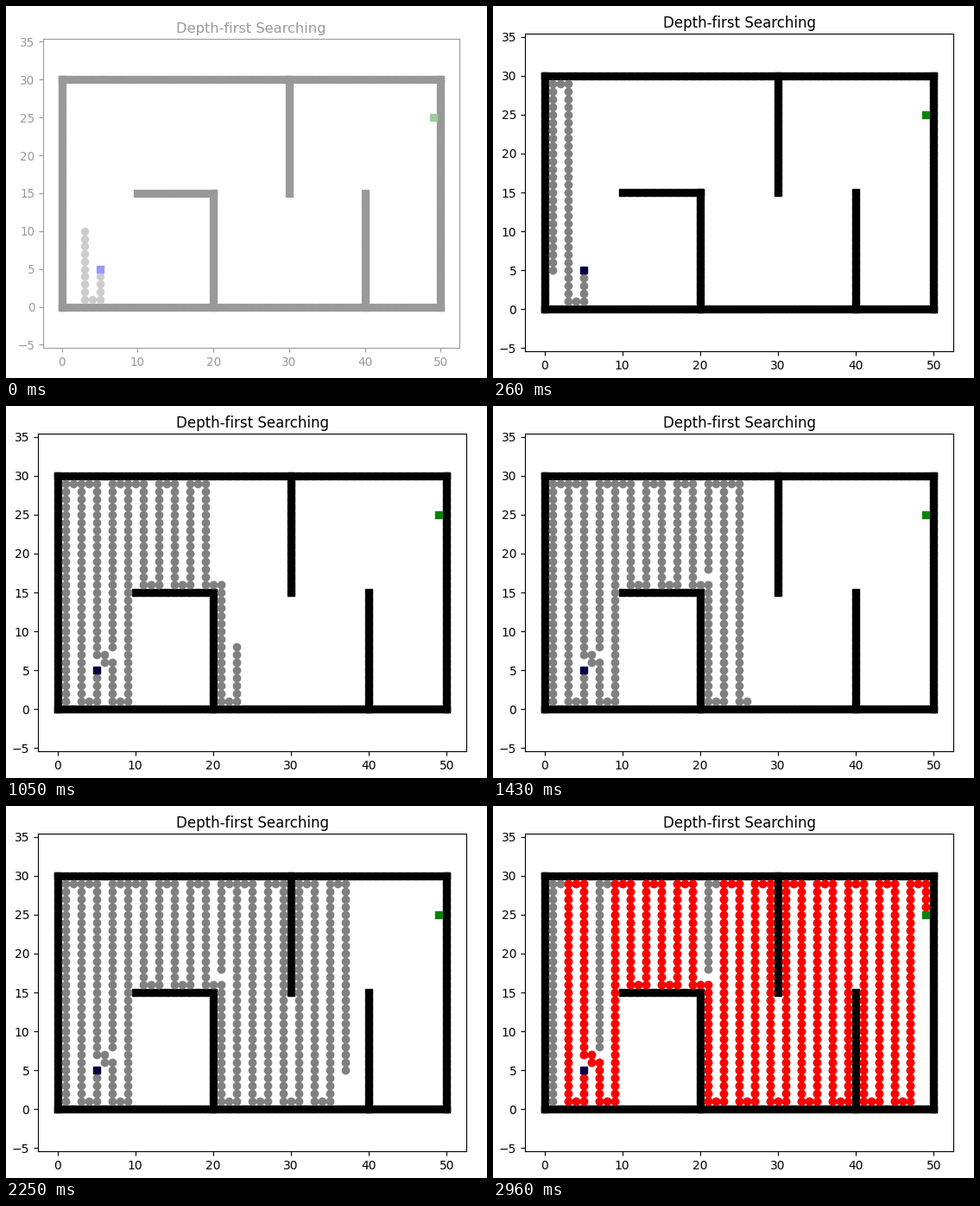
A matplotlib script for the animation above (3.56 s loop, 557 by 431 pixels).

```python
import matplotlib.pyplot as plt
import numpy as np
from matplotlib.animation import FuncAnimation

W, H, DPI = 557, 431, 100
LOOP, STEP = 3560, 10
START, GOAL = (5, 5), (49, 25)
AXES_BOX = (37, 31.8, 496, 368.4)  # left, top, width, height in pixels

FADE_STEPS, FADE_MS = 4, 130 / 3
PATH_TIME = 2960
# Search pace: cells visited at a few times in ms
PACE_CELLS = (15, 30, 150, 250, 455, 595, 649)
PACE_TIMES = (0, 130, 590, 1050, 1940, 2580, 2850)

plt.rcParams["font.family"] = "DejaVu Sans"


def make_walls():
    cells = [(x, y) for x in range(51) for y in (0, 30)]
    cells += [(x, y) for x in (0, 50) for y in range(31)]
    cells += [(x, y) for x in (20, 40) for y in range(16)]
    cells += [(x, 15) for x in range(10, 21)]
    cells += [(30, y) for y in range(15, 31)]
    return cells


def search(walls):
    """Depth-first search; returns the visited cells and the path."""
    blocked = set(walls)
    parent = {START: None}
    stack, visited = [START], []
    while stack:
        cell = stack.pop()
        if cell == GOAL:
            break
        visited.append(cell)
        for dx, dy in ((1, 0), (-1, 0), (0, 1), (0, -1)):
            near = (cell[0] + dx, cell[1] + dy)
            if near not in blocked and near not in parent:
                parent[near] = cell
                stack.append(near)
    path, cell = [], parent[GOAL]
    while cell != START:
        path.append(cell)
        cell = parent[cell]
    return visited[1:], path


def redraws(total):
    """Times and cell counts of the redraws, whose batches grow."""
    counts = [PACE_CELLS[0]]
    while counts[-1] < total:
        batch = 5 * round((4.3 + 0.065 * counts[-1]) / 5)
        counts.append(min(counts[-1] + min(max(batch, 15), 35), total))
    return np.round(np.interp(counts, PACE_CELLS, PACE_TIMES)), counts


def columns(cells):
    return [c[0] for c in cells], [c[1] for c in cells]


class View:
    """The whole plot at one opacity, shrunk to match."""

    def __init__(self, fig, opacity):
        self.opacity = opacity
        self.scale = s = 1 - 0.045 * (1 - opacity)
        shift = 250 * (1 - s)
        left, top, width, height = (v * s for v in AXES_BOX)
        self.ax = ax = fig.add_axes(
            [(left + shift) / W, 1 - (top + shift + height) / H,
             width / W, height / H])
        half = 55 * height / width / 2
        ax.set_xlim(-2.5, 52.5)
        ax.set_ylim(15 - half, 15 + half)
        ax.set_xticks(range(0, 51, 10))
        ax.set_yticks(range(-5, 36, 5))

        ink = self.shade(0, 0, 0)
        ax.tick_params(labelsize=10 * s, length=3.5 * s, width=0.8 * s,
                       pad=3.5 * s, color=ink, labelcolor=ink)
        for spine in ax.spines.values():
            spine.set(linewidth=0.8 * s, edgecolor=ink)
        ax.set_title("Depth-first Searching", fontsize=12 * s, pad=4.8 * s,
                     color=ink)

        # The start marker darkens from blue to navy as the plot appears
        blue = 0.25 + 0.75 * ((1 - opacity) / 0.6) ** 0.75
        self.marks("s", ink, walls)
        self.dots = self.marks("o", self.shade(0.5, 0.5, 0.5))
        self.route = self.marks("o", self.shade(1, 0, 0))
        self.marks("s", self.shade(0, 0, blue), [START])
        self.marks("s", self.shade(0.04, 0.51, 0.04), [GOAL])

    def shade(self, *rgb):
        return tuple(1 - self.opacity * (1 - c) for c in rgb)

    def marks(self, shape, color, cells=()):
        line, = self.ax.plot(*columns(cells), shape, color=color,
                             markersize=6 * self.scale,
                             markeredgewidth=self.scale)
        return line


walls = make_walls()
visited, path = search(walls)
times, counts = redraws(len(visited))

fig = plt.figure(figsize=((W + 1e-6) / DPI, (H + 1e-6) / DPI), dpi=DPI,
                 facecolor="white")
views = [View(fig, min(0.4 + k / 6, 1)) for k in range(FADE_STEPS + 1)]


def update(frame):
    t = frame * STEP
    view = views[min(int(t / FADE_MS + 1e-6), FADE_STEPS)]
    for other in views:
        other.ax.set_visible(other is view)
    shown = counts[np.searchsorted(times, t, side="right") - 1]
    view.dots.set_data(*columns(visited[:shown]))
    view.route.set_data(*columns(path if t >= PATH_TIME else []))
    return [view.dots, view.route]


anim = FuncAnimation(fig, update, frames=LOOP // STEP, interval=STEP,
                     init_func=lambda: update(0), repeat=True, repeat_delay=0)
plt.show()
```
